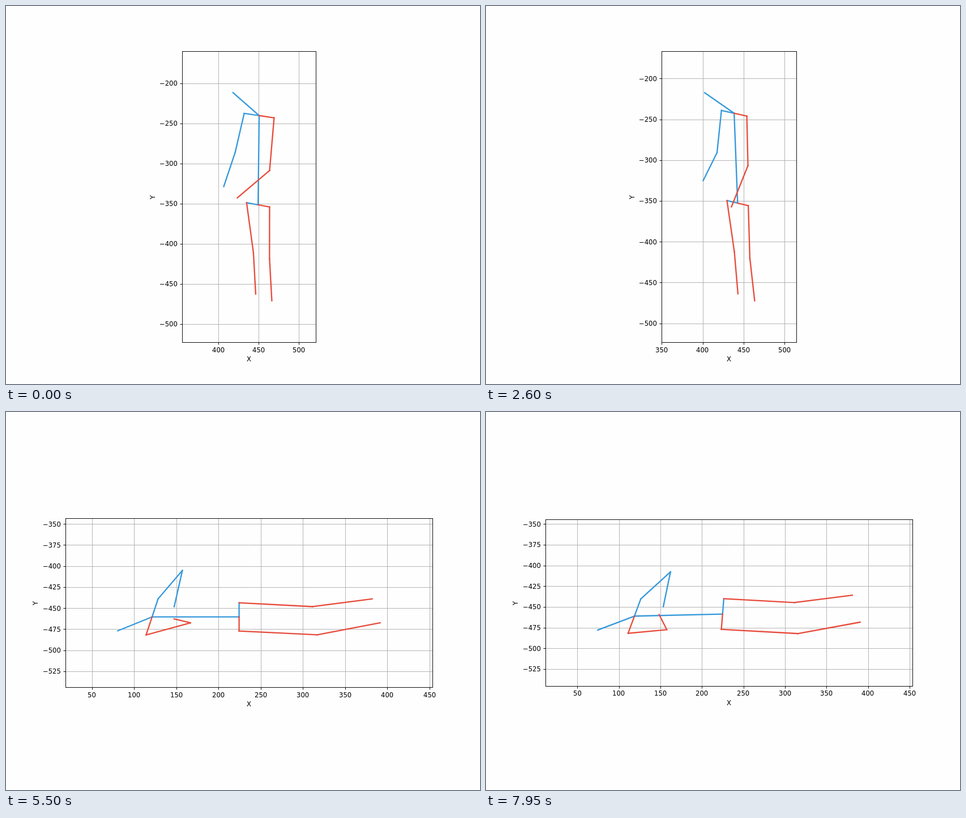
Animation, 837 px wide and 669 px high, one loop 8 s. Source, as an HTML page with a canvas:

```html
<!DOCTYPE html>
<html lang="en">
<head>
<meta charset="utf-8">
<title>Skeleton plot</title>
<style>
  html, body { margin: 0; width: 100%; height: 100%; overflow: hidden; background: #fefefe; }
  canvas { display: block; }
</style>
</head>
<body>
<canvas id="stage" width="837" height="669"></canvas>
<script>
const W = 837, H = 669, LOOP = 8000, STEP = 50;
const BLUE = '#3498db', RED = '#e74c3c';
const PT = W / 720;                 // the figure is 10 by 8 inches
const FIG_H = W * 0.8;
const BOX = { x: W * 0.125, y: H - FIG_H * 0.88, w: W * 0.775, h: FIG_H * 0.77 };
const FONT = 10 * PT + 'px "DejaVu Sans", Verdana, sans-serif';
const ctx = document.getElementById('stage').getContext('2d');

const BONES = [
  ['head neck farShoulder farElbow farHand', BLUE],
  ['neck pelvis farHip', BLUE],
  ['neck nearShoulder nearElbow nearHand', RED],
  ['pelvis nearHip nearKnee nearFoot', RED],
  ['farHip farKnee farFoot', RED]
].map(([names, color]) => ({ names: names.split(' '), color }));

// Key poses hold the free joints; bend is how far each knee leaves the leg's axis.
const stand = {
  head: [418.1, -211.7],
  farShoulder: [432, -237.5], farElbow: [420.9, -285.8], farHand: [406.6, -328.7],
  nearShoulder: [469.2, -243], nearElbow: [463.6, -308.7], nearHand: [423.4, -342.8],
  farHip: [435, -348.7], farFoot: [446.3, -462.6],
  nearHip: [463.6, -354.1], nearFoot: [466.4, -471],
  bend: [0.02, -0.014]
};
const lean = {
  head: [318.3, -238.6],
  farShoulder: [356.5, -244.4], farElbow: [313.2, -282.3], farHand: [270.8, -315.3],
  nearShoulder: [359.6, -262.1], nearElbow: [318.1, -315.3], nearHand: [273.8, -344.9],
  farHip: [401.1, -350.6], farFoot: [430.3, -465.9],
  nearHip: [401.1, -360.6], nearFoot: [456.9, -474.8],
  bend: [-0.036, -0.077]
};
const land = {
  head: [73.6, -446.5],
  farShoulder: [112.3, -454], farElbow: [132.1, -403.7], farHand: [132.1, -438.9],
  nearShoulder: [104.6, -488.9], nearElbow: [127.2, -466.4], nearHand: [151.2, -450.2],
  farHip: [213, -431], farFoot: [297.8, -361.4],
  nearHip: [220.7, -466.2], nearFoot: [359.6, -411.6],
  bend: [-0.342, -0.209]
};
const lie = {
  head: [80.6, -476.9],
  farShoulder: [128.4, -438.9], farElbow: [157.2, -405.2], farHand: [147.5, -448.3],
  nearShoulder: [114.2, -481.8], nearElbow: [166.8, -467.4], nearHand: [147.5, -462.7],
  farHip: [224.4, -443.6], farFoot: [382.1, -438.9],
  nearHip: [224.4, -477.1], nearFoot: [391.5, -467.4],
  bend: [-0.045, -0.059]
};

// The same pose shifted as a whole, with a few joints moved differently.
function nudge(pose, shift, moves) {
  const out = {};
  for (const name in pose) {
    const [dx, dy] = name === 'bend' ? [0, 0] : moves[name] || shift;
    out[name] = [pose[name][0] + dx, pose[name][1] + dy];
  }
  return out;
}

const relax = nudge(stand, [-1.8, -1], {
  head: [-6.3, -3.6], farElbow: [8.6, -5.7], farHand: [8.3, 2.4],
  nearShoulder: [-4.6, -1.5], nearElbow: [7.2, 3], nearHand: [29.5, -15.6]
});
const rest = nudge(lie, [2, -1], {
  farShoulder: [-2, -1], farHand: [-7, -1], nearShoulder: [-3, 4],
  nearHand: [-4, 4], farHip: [2, 4], nearHip: [2, 4]
});
const still = nudge(rest, [0, -0.5], {
  head: [-8, 0], farElbow: [3, -1.5], farHand: [13, -0.5], nearShoulder: [0, -4],
  nearElbow: [-11, -9], nearHand: [5, -0.5], farFoot: [-3, 4],
  nearHip: [-3, -4], nearFoot: [-3, 0]
});

const linear = u => u;
const easeOut = u => 1 - (1 - u) ** 3;

// Extra offsets that peak halfway through a phase.
const swing = name => [name === 'farHand' ? -8 : name === 'nearElbow' ? 4 : 0, 0];
const tumble = name => [0, /Foot/.test(name) ? -25 : /Hip/.test(name) ? 0 : 15];
const tremble = (name, i) => [0.8 * Math.sin(i * 2.4), 0.8 * Math.cos(i * 1.7)];

const PHASES = [
  { from: 0, to: 1550, a: stand, b: relax, ease: linear, arc: swing },
  { from: 1550, to: 2500, a: relax, b: relax, ease: linear, arc: tremble },
  { from: 2500, to: 3500, a: relax, b: lean, ease: linear, arc: tremble },
  { from: 3500, to: 4300, a: lean, b: land, ease: linear, arc: tumble },
  { from: 4300, to: 5500, a: land, b: lie, ease: easeOut, arc: tremble },
  { from: 5500, to: 6500, a: lie, b: rest, ease: linear, arc: tremble },
  { from: 6500, to: 7950, a: rest, b: still, ease: linear, arc: tremble }
];

const mix = (a, b, k) => a.map((v, i) => v + (b[i] - v) * k);

function knee(hip, foot, bend) {
  const dx = foot[0] - hip[0], dy = foot[1] - hip[1];
  return [hip[0] + dx * 0.55 - dy * bend, hip[1] + dy * 0.55 + dx * bend];
}

function jointsAt(t) {
  const p = PHASES.find(q => t < q.to) || PHASES[PHASES.length - 1];
  const u = Math.min(1, (t - p.from) / (p.to - p.from));
  const k = p.ease(u), bulge = Math.sin(Math.PI * u);
  const { bend: bendA, ...free } = p.a;
  const bend = mix(bendA, p.b.bend, k);
  const j = {};
  Object.keys(free).forEach((name, i) => {
    const [dx, dy] = p.arc(name, i);
    const [x, y] = mix(p.a[name], p.b[name], k);
    j[name] = [x + dx * bulge, y + dy * bulge];
  });
  j.neck = mix(j.farShoulder, j.nearShoulder, 0.5);
  j.pelvis = mix(j.farHip, j.nearHip, 0.5);
  j.farKnee = knee(j.farHip, j.farFoot, bend[0]);
  j.nearKnee = knee(j.nearHip, j.nearFoot, bend[1]);
  return j;
}

// Equal scale on both axes, padded by a fifth of the larger extent.
function viewOf(joints) {
  const pts = Object.values(joints);
  const xs = pts.map(p => p[0]), ys = pts.map(p => p[1]);
  const x0 = Math.min(...xs), x1 = Math.max(...xs);
  const y0 = Math.min(...ys), y1 = Math.max(...ys);
  const pad = 0.2 * Math.max(x1 - x0, y1 - y0);
  const dw = x1 - x0 + 2 * pad, dh = y1 - y0 + 2 * pad;
  const s = Math.min(BOX.w / dw, BOX.h / dh);
  const left = BOX.x + (BOX.w - dw * s) / 2;
  const top = BOX.y + (BOX.h - dh * s) / 2;
  return {
    left, top, right: left + dw * s, bottom: top + dh * s,
    xMin: x0 - pad, xMax: x1 + pad, yMin: y0 - pad, yMax: y1 + pad,
    px: x => left + (x - x0 + pad) * s,
    py: y => top + (y1 + pad - y) * s
  };
}

function ticks(lo, hi, length, spacing) {
  const bins = Math.max(1, Math.min(9, Math.floor(length / PT / spacing)));
  const step = [5, 10, 20, 25, 50, 100, 200].find(s => s >= (hi - lo) / bins);
  const out = [];
  for (let v = Math.ceil(lo / step) * step; v <= hi; v += step) out.push(v);
  return out;
}

const snap = v => Math.floor(v + 0.5) + 0.5;
const label = v => (v < 0 ? '\u2212' : '') + Math.abs(v);

function line(x0, y0, x1, y1, color, width) {
  ctx.strokeStyle = color;
  ctx.lineWidth = width;
  ctx.beginPath();
  ctx.moveTo(x0, y0);
  ctx.lineTo(x1, y1);
  ctx.stroke();
}

// Text starts on a whole pixel; align is 0.5 for centred and 1 for right.
function text(s, x, y, align) {
  ctx.fillText(s, Math.round(x - ctx.measureText(s).width * align), Math.round(y));
}

function draw(t) {
  const joints = jointsAt(t), v = viewOf(joints);
  const l = snap(v.left), r = snap(v.right), top = snap(v.top), b = snap(v.bottom);
  const thin = 0.8 * PT, tick = 3.5 * PT;

  ctx.fillStyle = '#fefefe';
  ctx.fillRect(0, 0, W, H);
  ctx.fillStyle = '#000';
  ctx.font = FONT;
  ctx.lineCap = 'butt';

  for (const n of ticks(v.xMin, v.xMax, v.right - v.left, 30)) {
    const x = snap(v.px(n));
    line(x, top, x, b, '#b0b0b0', thin);
    line(x, b, x, b + tick, '#000', thin);
    text(label(n), v.px(n), v.bottom + 17.4, 0.5);
  }
  for (const n of ticks(v.yMin, v.yMax, v.bottom - v.top, 20)) {
    const y = snap(v.py(n));
    line(l, y, r, y, '#b0b0b0', thin);
    line(l - tick, y, l, y, '#000', thin);
    text(label(n), v.left - 2 * tick, v.py(n) + 4.4, 1);
  }

  ctx.lineCap = 'square';
  for (const { names, color } of BONES) {
    for (let i = 1; i < names.length; i++) {
      const [p, q] = [joints[names[i - 1]], joints[names[i]]];
      line(v.px(p[0]), v.py(p[1]), v.px(q[0]), v.py(q[1]), color, 2 * PT);
    }
  }

  ctx.strokeStyle = '#000';
  ctx.lineWidth = thin;
  ctx.strokeRect(l, top, r - l, b - top);

  text('X', BOX.x + BOX.w / 2, v.bottom + 33.8, 0.5);
  ctx.save();
  ctx.translate(Math.round(v.left - 48.3), Math.round(BOX.y + BOX.h / 2));
  ctx.rotate(-Math.PI / 2);
  text('Y', 0, 0, 0.5);
  ctx.restore();
}

const start = performance.now();
function frame(now) {
  const t = Math.max(0, now - start) % LOOP;
  draw(Math.floor(t / STEP) * STEP);
  requestAnimationFrame(frame);
}
draw(0);
requestAnimationFrame(frame);
</script>
</body>
</html>
```
